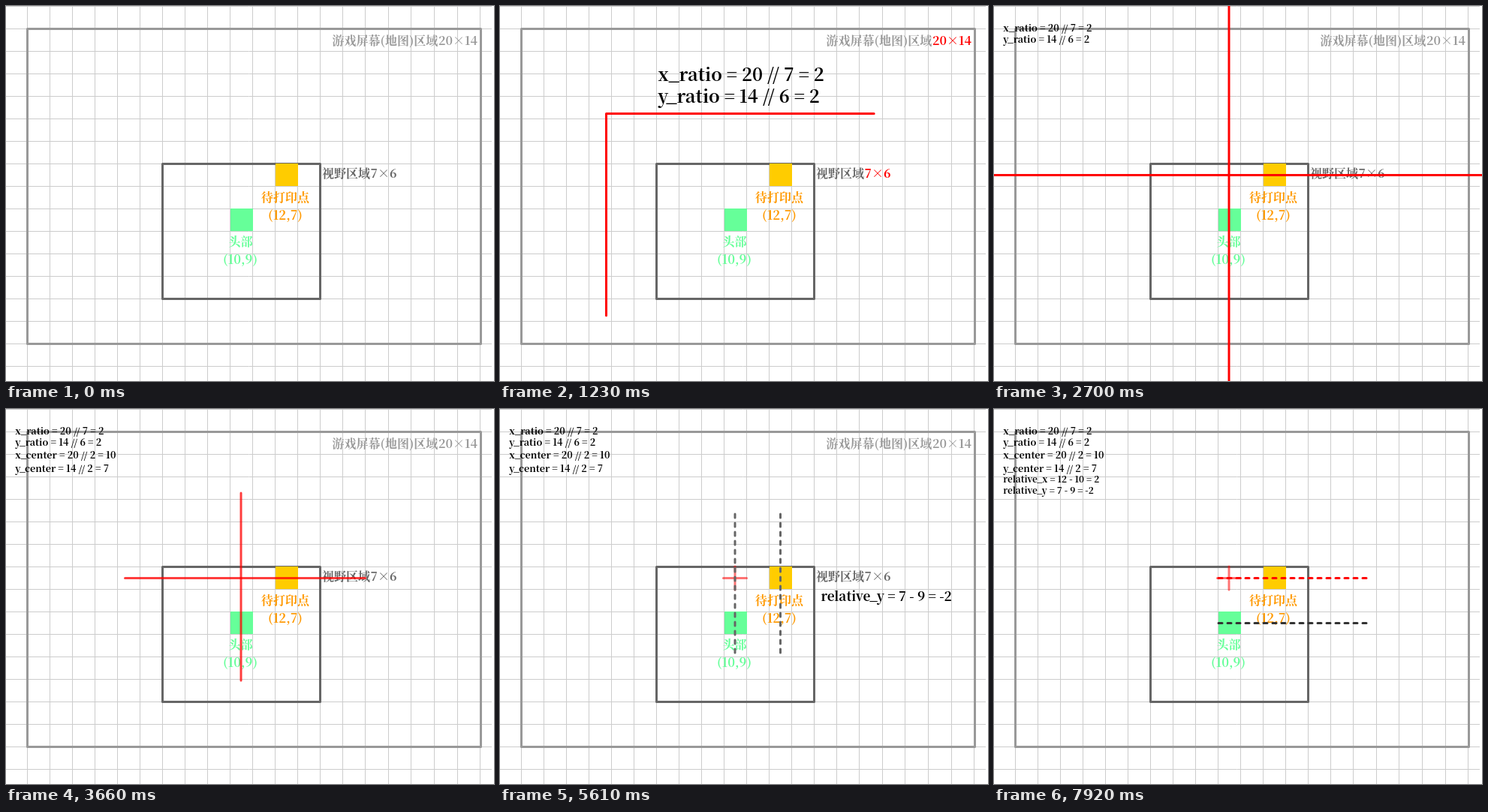
Write an HTML page with a canvas that moves like this. It is 650 by 500 pixels and loops after 8 s.

```html
<!DOCTYPE html>
<html lang="zh-CN">
<head>
<meta charset="utf-8">
<title>坐标换算</title>
<style>
html, body { margin: 0; width: 100%; height: 100%; overflow: hidden; background: #fff; }
canvas { display: block; }
</style>
</head>
<body>
<canvas id="stage" width="650" height="500"></canvas>
<script>
const ctx = document.getElementById('stage').getContext('2d');
const LOOP = 8000;
const FONT = '"Noto Serif CJK SC", "Noto Serif", "Noto Sans CJK SC", serif';
const RED = '#ff0000', DARK = '#333333', GREY = '#666666';
const CX = 313, CY = 225.5;

const map = { left: 28.5, top: 30.5, right: 632.5, bottom: 450.5 };
const view = { left: 208.5, top: 210.5, right: 418.5, bottom: 390.5 };

// Each note appears at one place, then shrinks into the list in the corner.
const notes = [
  { rows: ['x_ratio = 20 // 7 = 2', 'y_ratio = 14 // 6 = 2'], show: [570, 770], move: [1755, 2025],
    from: { x: 210.5, y: 100, size: 23.6, lead: 29.3 }, to: { x: 12.3, y: 33.5, size: 12.6, lead: 15.5 } },
  { rows: ['x_center = 20 // 2 = 10', 'y_center = 14 // 2 = 7'], show: [2790, 2970], move: [3130, 3400],
    from: { x: 321, y: 174.5, size: 17.1, lead: 24.5 }, to: { x: 12.3, y: 65.5, size: 12.6, lead: 18 } },
  { rows: ['relative_y = 7 - 9 = -2'], show: [5140, 5350], move: [6905, 7170],
    from: { x: 427.5, y: 256, size: 17.2, lead: 0 }, to: { x: 12.3, y: 112.5, size: 11.9, lead: 0 } },
  { rows: ['relative_x = 12 - 10 = 2'], show: [6190, 6390], move: [6640, 6905],
    from: { x: 284.5, y: 186, size: 17.2, lead: 0 }, to: { x: 12.3, y: 98, size: 11.9, lead: 0 } }
];

const mix = (a, b, k) => a + (b - a) * k;
const mixAll = (a, b, k) =>
  Object.fromEntries(Object.keys(a).map(key => [key, mix(a[key], b[key], k)]));
const ramp = (t, start, end) => Math.min(1, Math.max(0, (t - start) / (end - start)));
const ease = (t, start, end) => {
  const k = ramp(t, start, end);
  return k * k * (3 - 2 * k);
};
const pulse = (t, inA, inB, outA, outB) => ramp(t, inA, inB) * (1 - ramp(t, outA, outB));

function path(points, color, width, alpha = 1, dash = []) {
  if (alpha <= 0) return;
  ctx.globalAlpha = alpha;
  ctx.strokeStyle = color;
  ctx.lineWidth = width;
  ctx.setLineDash(dash);
  ctx.beginPath();
  points.forEach(([x, y]) => ctx.lineTo(x, y));
  ctx.stroke();
  ctx.globalAlpha = 1;
}

function text(str, x, y, size, color, alpha = 1, align = 'left') {
  if (alpha <= 0) return;
  ctx.globalAlpha = alpha;
  ctx.font = `600 ${size}px ${FONT}`;
  ctx.textAlign = align;
  ctx.fillStyle = color;
  ctx.fillText(str, x, y);
  ctx.globalAlpha = 1;
}

function frameRect(r, color) {
  ctx.setLineDash([]);
  ctx.strokeStyle = color;
  ctx.lineWidth = 3;
  ctx.strokeRect(r.left, r.top, r.right - r.left, r.bottom - r.top);
}

function grid() {
  for (let n = 0; n <= 20; n++) {
    const x = n <= 14 ? 28 + 30 * n : 448 + 30.6 * (n - 14);
    path([[Math.floor(x) + 0.5, 0], [Math.floor(x) + 0.5, 500]], '#cccccc', 1);
  }
  for (let y = 0.5; y < 500; y += 30) path([[0, y], [647, y]], '#cccccc', 1);
}

function label(words, numbers, x, numX, y, color, red, alpha) {
  text(words, x, y, 16, color, alpha);
  text(numbers, numX, y, 16, color, alpha * (1 - red));
  text(numbers, numX, y, 16, RED, alpha * red);
}

function scene(t) {
  const red = pulse(t, 370, 570, 2020, 2220);
  const labels = 1 - ramp(t, 7320, 7520);
  label('游戏屏幕(地图)区域', '20×14', 434.5, 576, 51.5, '#999999', red, labels);
  frameRect(map, '#999999');
  frameRect(view, GREY);
  label('视野区域', '7×6', 421, 485.5, 228.5, GREY, red, labels);

  ctx.fillStyle = '#ffcc00';
  ctx.fillRect(359, 210, 30, 30);
  ctx.fillStyle = '#66ff99';
  ctx.fillRect(299, 270, 30, 30);
  text('待打印点', 372, 260.5, 16, '#ff9900', 1, 'center');
  text('(12,7)', 372, 285, 16.5, '#ff9900', 1, 'center');
  text('头部', 312.5, 319.5, 16, '#66ff99', 1, 'center');
  text('(10,9)', 312, 344, 16.5, '#66ff99', 1, 'center');
}

// Top and left edges travel from the map down to the view.
function corner(t) {
  const e = mixAll(map, view, ease(t, 1020, 1380));
  path([[e.left, e.bottom], [e.left, e.top], [e.right, e.top]], RED, 3,
    pulse(t, 770, 1000, 1400, 1700));
}

function centerLines(t) {
  if (t < 2220) return;
  const shrink = ease(t, 3400, 3900);
  const alpha = mix(1, 0.55, shrink);
  const top = mix(0, CY - 15.5, shrink), left = mix(0, CX - 15.5, shrink);
  const bottom = mix(500, CY + 15.5, shrink), right = mix(650, CX + 15.5, shrink);
  const down = ease(t, 2220, 2450), across = ease(t, 2450, 2690);
  if (down > 0) path([[CX, top], [CX, mix(top, bottom, down)]], RED, 3, alpha);
  if (across > 0) path([[left, CY], [mix(left, right, across), CY]], RED, 3, alpha);
}

function dashed(points, color, alpha) {
  ctx.lineCap = 'round';
  path(points, color, 3, alpha, [5, 7]);
}

function guides(t) {
  const rows = pulse(t, 4200, 4400, 4920, 5120);
  const cols = pulse(t, 5400, 5600, 5970, 6170);
  const last = ramp(t, 7690, 7910);
  for (const y of [CY, CY + 60]) dashed([[269, y], [599, y]], GREY, rows);
  for (const x of [CX, CX + 60.5]) dashed([[x, 140], [x, 325]], GREY, cols);
  dashed([[299, CY], [496, CY]], RED, last);
  dashed([[299, CY + 60], [496, CY + 60]], DARK, last);
}

function draw() {
  const t = performance.now() % LOOP;
  ctx.fillStyle = '#ffffff';
  ctx.fillRect(0, 0, 650, 500);
  ctx.lineJoin = 'round';
  ctx.lineCap = 'butt';
  grid();
  scene(t);
  for (const n of notes) {
    const p = mixAll(n.from, n.to, ease(t, ...n.move));
    n.rows.forEach((row, i) =>
      text(row, p.x, p.y + i * p.lead, p.size, '#000000', ramp(t, ...n.show)));
  }
  ctx.lineCap = 'round';
  corner(t);
  centerLines(t);
  guides(t);
  requestAnimationFrame(draw);
}
draw();
</script>
</body>
</html>
```
